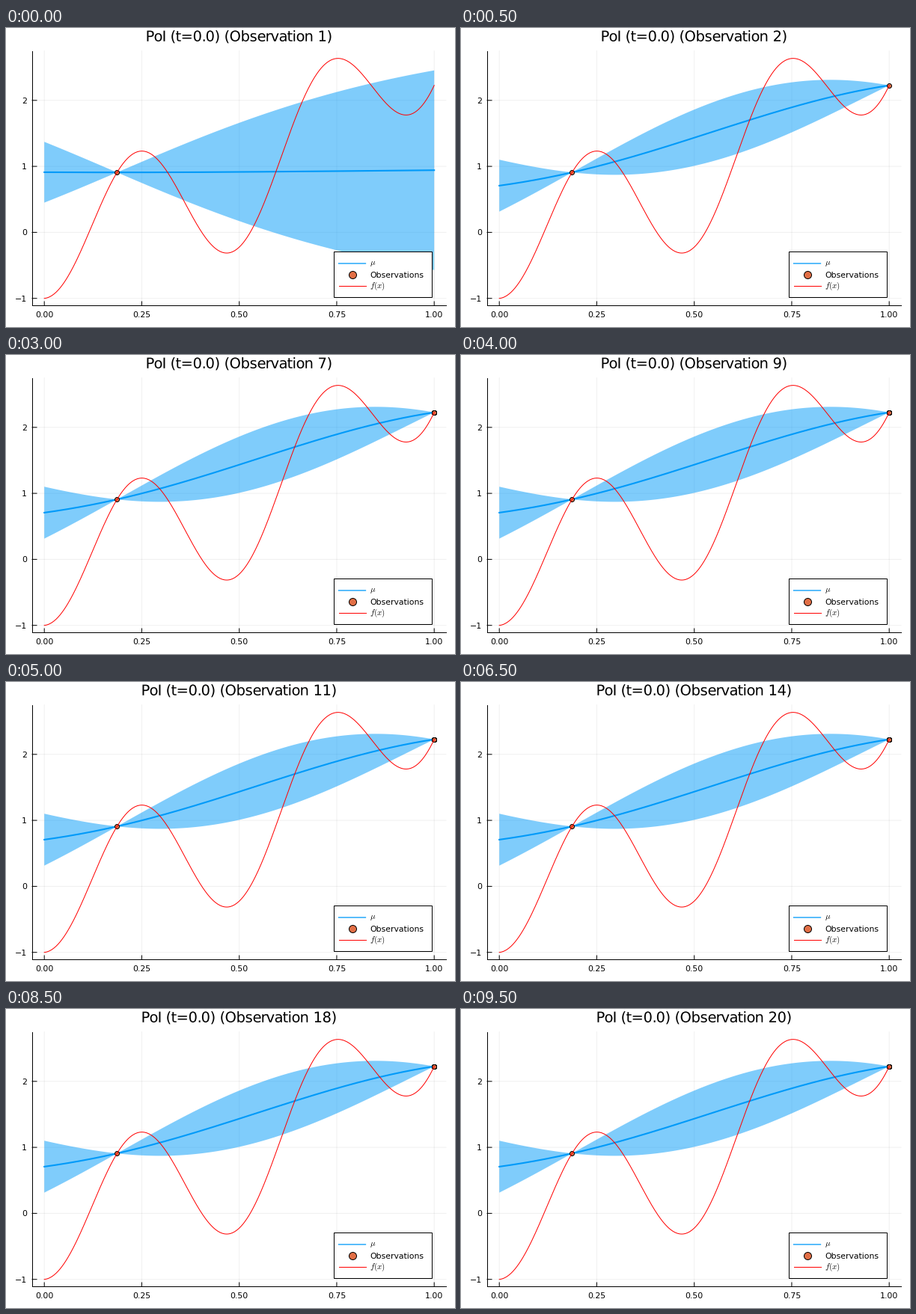
Recreate the animation shown at these times as a matplotlib script. Size 600 by 400 pixels, loop 10 s.

```python
import math

import numpy as np
import matplotlib.pyplot as plt
from matplotlib.animation import FuncAnimation
from matplotlib.patches import PathPatch, Rectangle
from matplotlib.path import Path
from matplotlib.textpath import TextPath

WIDTH, HEIGHT, DPI = 600, 400, 100
PX = 72 / DPI  # points per pixel
FRAMES, INTERVAL = 20, 500
LEFT, RIGHT, TOP, BOTTOM = 35, 588, 30.6, 371
BLUE, ORANGE, RED = "#009af9", "#e26f46", "#ff0000"
PRIOR_MEAN = 1.0
FIRST_X = 0.1865
TITLE_SIZE, TITLE_X, TITLE_Y = 14 / PX, 311.5, 17.75

plt.rcParams["font.family"] = "DejaVu Sans"
plt.rcParams["mathtext.fontset"] = "cm"


def to_x(x):
    return 51.2 + 521 * np.asarray(x)


def to_y(y):
    return 273.4 - 88.3 * np.asarray(y)


def objective(x):
    trend = 0.54 * x + 1.29 * x**2 + 1.31 * x**3
    return trend - (1 + 0.006 * x) * np.cos(13 * x)


def matern52(a, b):
    r = np.sqrt(5) * np.abs(np.subtract.outer(a, b))
    return (1 + r + r**2 / 3) * np.exp(-r)


def posterior(x, observed):
    """Mean and 95 % half-width of the process given the observed points."""
    cross = matern52(x, observed)
    weights = np.linalg.solve(matern52(observed, observed), cross.T).T
    mean = PRIOR_MEAN + weights @ (objective(observed) - PRIOR_MEAN)
    variance = 1 - np.sum(weights * cross, axis=1)
    return mean, 1.96 * np.sqrt(np.clip(variance, 0, None))


fig = plt.figure(figsize=(WIDTH / DPI, HEIGHT / DPI), dpi=DPI, facecolor="white")
ax = fig.add_axes([0, 0, 1, 1])
ax.set_xlim(0, WIDTH)
ax.set_ylim(HEIGHT, 0)
ax.axis("off")


def line(xs, ys, color="black", width=1.0, **style):
    return ax.plot(xs, ys, color=color, lw=width * PX, **style)[0]


def label(x, y, text, size=11, **style):
    return ax.text(x, y, text, fontsize=size * PX, va="baseline", zorder=12, **style)


def dots(xs, ys, size, zorder):
    return ax.plot(xs, ys, "o", ms=size * PX, mfc=ORANGE, mec="black",
                   mew=PX, zorder=zorder, snap=False)[0]


def advance(char, size):
    """Pen advance of one glyph, cut to whole pixels."""
    def ink_width(text):
        return TextPath((0, 0), text, size=size).get_extents().width
    return math.floor(ink_width(f"H{char}H") - ink_width("HH"))


def title_path(text):
    pen, glyphs = 0, []
    for char in text:
        if char != " ":
            glyphs.append(TextPath((pen, 0), char, size=TITLE_SIZE))
        pen += advance(char, TITLE_SIZE)
    path = Path.make_compound_path(*glyphs)
    box = path.get_extents()
    vertices = path.vertices * [1, -1] + [TITLE_X - (box.x0 + box.x1) / 2, TITLE_Y]
    return Path(vertices, path.codes)


def draw_axes():
    grid = dict(color="black", alpha=0.06, zorder=1, snap=False)
    tick = dict(zorder=8, snap=False)
    for value in (0, 0.25, 0.5, 0.75, 1):
        x = to_x(value)
        line([x, x], [TOP, BOTTOM], **grid)
        line([x, x], [BOTTOM, BOTTOM - 5], **tick)
        label(x, 387, f"{value:.2f}", ha="center")
    for value in (-1, 0, 1, 2):
        y = to_y(value)
        line([LEFT, RIGHT], [y, y], **grid)
        line([LEFT, LEFT + 6], [y, y], **tick)
        label(28, y + 4, str(value).replace("-", "\u2212"), ha="right")
    line([LEFT, LEFT], [TOP, BOTTOM], zorder=8)
    line([LEFT, RIGHT], [BOTTOM, BOTTOM], zorder=8)


def draw_legend():
    ax.add_patch(Rectangle((438, 299), 131, 61, fc="white", ec="black",
                           lw=PX, zorder=10))
    line([444.5, 480.5], [315, 315], BLUE, 1.3, zorder=11, snap=False)
    dots([462.5], [329.7], 10, 11)
    line([444.5, 480.5], [345, 345], RED, zorder=11)
    label(486.3, 317.2, r"$\mu$")
    label(486.3, 333.7, "Observations", 10.9)
    label(486.3, 348.2, r"$f(x)$")


draw_axes()
draw_legend()

grid_x = np.linspace(0, 1, 400)
line(to_x(grid_x), to_y(objective(grid_x)), RED, zorder=6)
mean_line = line([], [], BLUE, 2.1, zorder=4)
points = dots([], [], 6, 5)
band = ax.fill([0, 0, 0], [0, 0, 0], color=BLUE, alpha=0.5, lw=0, zorder=3)[0]
title = ax.add_patch(PathPatch(title_path("PoI"), fc="black", lw=0, zorder=12))


def update(i):
    # After the first step every new observation lands on the right end.
    observed = np.array([FIRST_X] + [1.0] * i)
    mean, half = posterior(grid_x, np.unique(observed))
    outline_x = np.r_[grid_x, grid_x[::-1]]
    outline_y = np.r_[mean + half, (mean - half)[::-1]]
    band.set_xy(np.column_stack([to_x(outline_x), to_y(outline_y)]))
    mean_line.set_data(to_x(grid_x), to_y(mean))
    points.set_data(to_x(observed), to_y(objective(observed)))
    title.set_path(title_path(f"PoI (t=0.0) (Observation {i + 1})"))
    return band, mean_line, points, title


animation = FuncAnimation(fig, update, frames=FRAMES, interval=INTERVAL,
                          init_func=lambda: update(0), repeat=True, repeat_delay=0)
plt.show()
```
